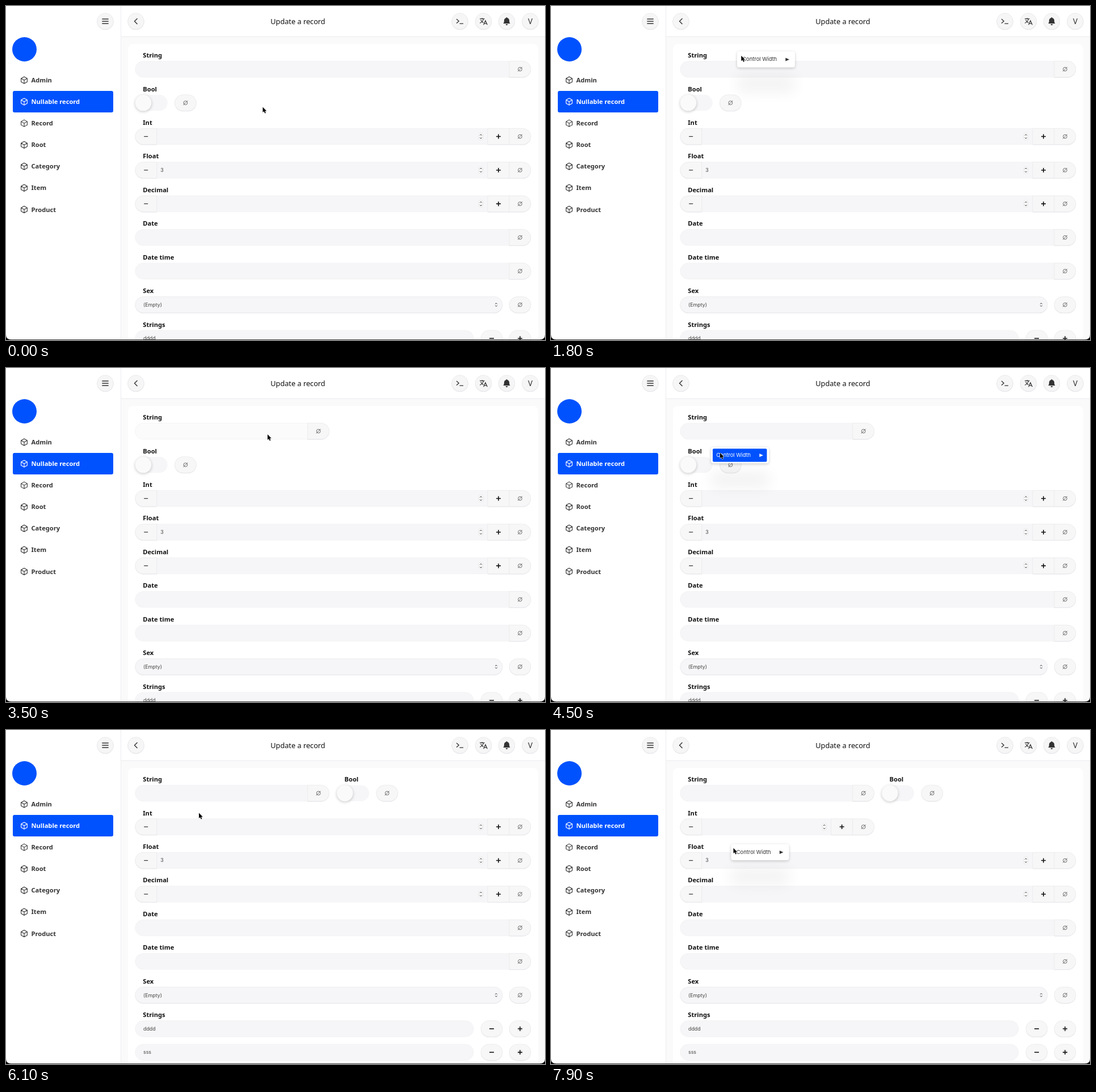
These frames come from a looping animation (950x590 px, 8000 ms). An HTML page:

```html
<!DOCTYPE html>
<html lang="en">
<head>
<meta charset="utf-8">
<title>Update a record</title>
<style>
html, body { margin: 0; width: 100%; height: 100%; overflow: hidden; background: #fff; }
svg { display: block; }
text { font-family: "Noto Sans", "Open Sans", sans-serif; white-space: pre; }
.b { font-weight: 700; font-size: 11.13px; }
.s { font-family: Inter, Roboto, sans-serif; font-size: 8.9px; fill: #444; }
.m { font-family: Inter, Roboto, sans-serif; font-size: 9.4px; }
</style>
</head>
<body>
<svg id="stage" width="950" height="590" viewBox="0 0 950 590">
  <defs>
    <filter id="soft" x="-60%" y="-150%" width="220%" height="400%"><feGaussianBlur stdDeviation="13"/></filter>
    <filter id="near" x="-20%" y="-50%" width="140%" height="200%"><feGaussianBlur stdDeviation="2.4"/></filter>
  </defs>
</svg>
<script>
const stage = document.getElementById('stage');
const BLUE = '#0052ff', FIELD = '#f6f6f8', HOVER = '#fbfbfc', EDGE = '#ebebee', INK = '#333';
const FULL = 925, HALF = 569.7, LEFT = 227.7, COL2 = 583, STEP = 59.45, R = 14.2;

function el(parent, tag, attrs, text) {
  const node = document.createElementNS('http://www.w3.org/2000/svg', tag);
  for (const k in attrs) node.setAttribute(k, attrs[k]);
  if (text !== undefined) node.textContent = text;
  parent.appendChild(node);
  return node;
}
const group = (p, x = 0, y = 0) => el(p, 'g', { transform: `translate(${x} ${y})` });
const rect = (p, x, y, width, height, fill, rx = 0, more = {}) =>
  el(p, 'rect', { x, y, width, height, fill, rx, ...more });
const circle = (p, cx, cy, r, fill, more = {}) => el(p, 'circle', { cx, cy, r, fill, ...more });
const line = (p, d, width = 1.3, stroke = INK, more = {}) =>
  el(p, 'path', { d, fill: 'none', stroke, 'stroke-width': width, ...more });
const label = (p, x, y, str, cls, fill = '#111', more = {}) =>
  el(p, 'text', { x, y, class: cls, fill, ...more }, str);
const show = (node, on) => node.setAttribute('visibility', on ? 'visible' : 'hidden');

// ---------- frame of the page ----------
function roundButton(x) {
  circle(stage, x, 27.7, 14.6, '#e6e6e9');
  circle(stage, x, 27, 14.3, '#f6f6f7', { stroke: EDGE });
  return group(stage, x, 27);
}

function page() {
  rect(stage, 0, 0, 950, 590, '#fff');
  rect(stage, 203, 54, 747, 536, '#fafafb');
  rect(stage, 202, 0, 1, 590, '#ededf0');
  rect(stage, 203, 53.5, 747, 1, '#ebebee');
  rect(stage, 215, 67, 723, 560, '#fff', 9);
  circle(stage, 32.5, 76.5, 21.5, BLUE);
  label(stage, 514.5, 31.6, 'Update a record', '', '#111',
    { 'text-anchor': 'middle', 'font-size': 12.72, 'font-weight': 500 });

  line(roundButton(175), 'M-5.7-4H5.7M-5.7 0H5.7M-5.7 4H5.7', 1.3);
  line(roundButton(229), 'M2.5-5L-2.5 0L2.5 5', 1.4);
  line(roundButton(800), 'M-6-4L-1.8-.2L-6 3.6M-.5 4.2H6', 1.3);
  line(roundButton(841.5), 'M-6.5-4.3H2M-2.3-6V-4.3M.3-4.3C-.8-.5-3.5 2-6.3 3.2M-4.8-2.2C-3.6 .2-2 1.7 0 2.6M.2 6.3L3.5-1.3L6.8 6.3M1.3 3.8H5.7', 1.2);
  el(roundButton(882.5), 'path', {
    fill: INK,
    d: 'M-6.2 3.9C-4.8 2.7-4.6 1.2-4.6-1.2C-4.6-4-2.9-5.6-.8-6V-7H.8V-6C2.9-5.6 4.6-4 4.6-1.2C4.6 1.2 4.8 2.7 6.2 3.9ZM-1.9 5H1.9A1.9 1.9 0 0 1-1.9 5Z'
  });
  label(roundButton(924), 0, 4.7, 'V', '', INK,
    { 'text-anchor': 'middle', 'font-size': 13.5, 'font-weight': 500 });

  const names = ['Admin', 'Nullable record', 'Record', 'Root', 'Category', 'Item', 'Product'];
  names.forEach((name, i) => {
    const y = 131 + 38.07 * i, on = i === 1, ink = on ? '#fff' : INK;
    if (on) rect(stage, 12, 150, 177, 38, BLUE, 3);
    line(group(stage, 32, y), 'M0-6L5.4-3V3L0 6L-5.4 3V-3ZM-5.4-3L0 0L5.4-3M0 0V6', 1.1, ink,
      { 'stroke-linejoin': 'round' });
    label(stage, 44.5, y + 4.1, name, 'b', ink);
  });
}

// ---------- form controls ----------
// bar with optionally rounded ends
function bar(x1, x2, y, l, r) {
  const a = l ? R : 0, b = r ? R : 0;
  return `M${x1 + a} ${y - R}H${x2 - b}` + (b ? `a${R} ${R} 0 0 1 0 ${2 * R}` : `v${2 * R}`) +
    `H${x1 + a}` + (a ? `a${R} ${R} 0 0 1 0 ${-2 * R}Z` : 'Z');
}
function button(p, x1, x2, y, l, r, icon, width, ink = '#111') {
  const d = bar(x1, x2, y, l, r);
  el(p, 'path', { d, fill: '#e4e4e8', transform: 'translate(0 .9)' });
  el(p, 'path', { d, fill: '#f7f7f8', stroke: EDGE, 'stroke-width': .9 });
  line(group(p, (x1 + x2) / 2, y), icon, width, ink);
}
const NULL = 'M3.4 0A3.4 3.4 0 1 1-3.4 0A3.4 3.4 0 1 1 3.4 0M-3.9 3.9L3.9-3.9';
const MINUS = 'M-4 0H4', PLUS = 'M-4 0H4M0-4V4';
const nullButton = (p, right, y, joined) => button(p, right - 38, right, y, !joined, true, NULL, .85, '#555');

const forms = [];
function buildForm(n) {
  const g = group(stage), inputs = [];
  let row = 0, y;

  function next(name, x = LEFT) {
    y = 111.6 + STEP * row++;
    label(g, x + 13.6, y - 20.5, name, 'b');
  }
  function input(x1, x2, l, r) {
    const node = el(g, 'path', { d: bar(x1, x2, y, l, r), fill: FIELD, stroke: '#f1f1f3', 'stroke-width': .8 });
    inputs.push({ node, x1, x2, y });
  }
  function textField(name, right = FULL) {
    next(name);
    input(LEFT, right - 38, true, false);
    nullButton(g, right, y, true);
  }
  function numberField(name, value, right = FULL) {
    next(name);
    input(LEFT + 38, right - 76, false, false);
    button(g, LEFT, LEFT + 38, y, true, false, 'M-3.5 0H3.5', 1.2, INK);
    label(g, 272.2, y + 2.7, value, 's');
    const spin = group(g, right - 88, y);
    rect(spin, -3.6, -6, 7.2, 12, '#fff', 3, { stroke: '#ddd', 'stroke-width': .7 });
    line(spin, 'M-1.8-1.8L0-3.8L1.8-1.8M-1.8 1.8L0 3.8L1.8 1.8', 1);
    button(g, right - 76, right - 38, y, false, false, PLUS, 1.6);
    nullButton(g, right, y, true);
  }
  function toggle(x) {
    next('Bool', x);
    el(g, 'path', { d: bar(x, x + 57, y, true, true), fill: FIELD });
    circle(g, x + 14.3, y + 1.4, 14.6, '#000', { opacity: .2, filter: 'url(#near)' });
    circle(g, x + 14.3, y, 14.3, '#fafafa');
    nullButton(g, x + 107.7, y, false);
  }
  function listItem(value) {
    input(LEFT, 824, true, true);
    label(g, 242, y + 3, value, 's');
    button(g, 837, 875, y, true, true, MINUS, 1.6);
    button(g, 887, FULL, y, true, true, PLUS, 1.6);
  }

  textField('String', n > 0 ? HALF : FULL);
  if (n > 1) row = 0;
  toggle(n > 1 ? COL2 : LEFT);
  numberField('Int', '', n > 2 ? HALF : FULL);
  numberField('Float', '3');
  numberField('Decimal', '');
  textField('Date');
  textField('Date time');
  next('Sex');
  el(g, 'path', { d: bar(LEFT, 875, y, true, true), fill: '#e4e4e8', transform: 'translate(0 .9)' });
  el(g, 'path', { d: bar(LEFT, 875, y, true, true), fill: FIELD, stroke: EDGE, 'stroke-width': .9 });
  label(g, 242, y + 3.2, '(Empty)', 's');
  line(group(g, 864, y), 'M-1.8-1.2L0-3L1.8-1.2M-1.8 1.2L0 3L1.8 1.2', 1);
  nullButton(g, FULL, y, false);
  next('Strings');
  listItem('dddd');
  y += 41.6;
  listItem('sss');
  forms.push({ g, inputs });
}

// ---------- context menu ----------
function panel(p, w, h) {
  rect(p, 0, 43, w, h, '#000', 4, { opacity: .05, filter: 'url(#soft)' });
  rect(p, 0, 1.5, w, h, '#000', 4, { opacity: .2, filter: 'url(#near)' });
  rect(p, 0, 0, w, h, '#fff', 4);
}
function menuItem(p, x, y, w, str, textX, mark) {
  const back = rect(p, x, y, w, 23.2, BLUE, 2);
  const ink = group(p);
  label(ink, textX, y + 14.6, str, 'm', 'inherit');
  if (mark) el(ink, 'path', mark);
  return on => {
    show(back, on);
    ink.setAttribute('fill', on ? '#fff' : '#333');
    ink.setAttribute('stroke', on ? '#fff' : '#333');
    ink.setAttribute('stroke-width', 0);
  };
}
let menu, sub, parentItem, subItems;
function buildMenu() {
  menu = group(stage);
  panel(menu, 102, 28.5);
  parentItem = menuItem(menu, 3, 2.8, 95.5, 'Control Width', 9.2, { d: 'M85.3 11.4L92 14.4L85.3 17.4Z' });
  sub = group(menu, 99, 0);
  panel(sub, 142, 77.5);
  const check = { d: 'M9.8 14.8L12.6 17.5L17.8 11.2', fill: 'none', 'stroke-width': 1.6 };
  subItems = ['Full', 'Half', 'One-third'].map((s, i) =>
    menuItem(sub, 3, 3 + 24 * i, 135.5, s + ' Line Width', 24.8, i ? null : check));
}

// ---------- timeline ----------
// time, x, y of the pointer
const path = [
  [200, 452.5, 178.5], [1100, 325.5, 98], [1400, 328.5, 87.5], [1700, 328.5, 87.5],
  [1800, 335.3, 87.7], [2200, 428, 94], [2600, 461, 117.3], [3500, 461, 117.3],
  [4300, 282.5, 147.3], [4400, 284, 147.5], [4500, 298, 150], [4800, 390, 157],
  [5100, 431, 178], [5700, 431, 178], [6100, 340, 146.5], [6300, 340, 146.5],
  [6700, 440, 157], [7000, 478, 174.3], [7100, 478, 174.3], [7700, 317.5, 208.5],
  [7800, 317.5, 208.5], [7900, 321.5, 208.5]
];
// opens, submenu opens, closes, x, y
const menus = [
  [1600, 2000, 3500, 328, 80], [4400, 4600, 5300, 282, 139.8],
  [6300, 6500, 7200, 339, 139.6], [7900, 9000, 9000, 317.5, 201.6]
];
const changes = [3500, 5300, 7200];

function pointerAt(t) {
  const i = path.findIndex(k => k[0] > t);
  if (i < 0) return path[path.length - 1].slice(1);
  if (i === 0) return path[0].slice(1);
  const a = path[i - 1], b = path[i], u = (t - a[0]) / (b[0] - a[0]);
  const e = b[0] - a[0] > 400 ? u + (u * u * (3 - 2 * u) - u) * .6 : u;
  return [a[1] + (b[1] - a[1]) * e, a[2] + (b[2] - a[2]) * e];
}

function draw(time) {
  const t = Math.floor(time % 8000 / 100) * 100;
  const [x, y] = pointerAt(t);
  const open = menus.find(m => t >= m[0] && t < m[2]);
  const step = changes.filter(c => t >= c).length;

  forms.forEach((f, i) => f.g.setAttribute('display', i === step ? 'inline' : 'none'));
  for (const f of forms[step].inputs) {
    const over = !open && x > f.x1 && x < f.x2 && Math.abs(y - f.y) < R;
    f.node.setAttribute('fill', over ? HOVER : FIELD);
  }

  menu.setAttribute('display', open ? 'inline' : 'none');
  if (open) {
    const [, subTime, , mx, my] = open;
    const subOn = t >= subTime, inSub = subOn && x > mx + 99;
    const hot = inSub ? Math.floor((y - my - 3) / 24) : -1;
    menu.setAttribute('transform', `translate(${mx} ${my})`);
    sub.setAttribute('display', subOn ? 'inline' : 'none');
    parentItem(!inSub && x > mx + 8);
    subItems.forEach((item, i) => item(i === hot));
  }
  pointer.setAttribute('transform', `translate(${x} ${y})`);
}

page();
for (let n = 0; n < 4; n++) buildForm(n);
buildMenu();
const pointer = el(stage, 'path', {
  d: 'M0 0V9.6L2.2 7.6L3.7 11.1L5.4 10.4L3.9 7H6.8Z',
  fill: '#000', stroke: '#fff', 'stroke-width': 1, 'paint-order': 'stroke', 'stroke-linejoin': 'round'
});
// dark window corners and bottom edge
el(stage, 'path', { d: 'M0 581Q0 589.2 9 589.2H941Q950 589.2 950 581V590H0Z', fill: '#000' });

const start = performance.now();
function loop() {
  draw(performance.now() - start);
  requestAnimationFrame(loop);
}
loop();
</script>
</body>
</html>
```
